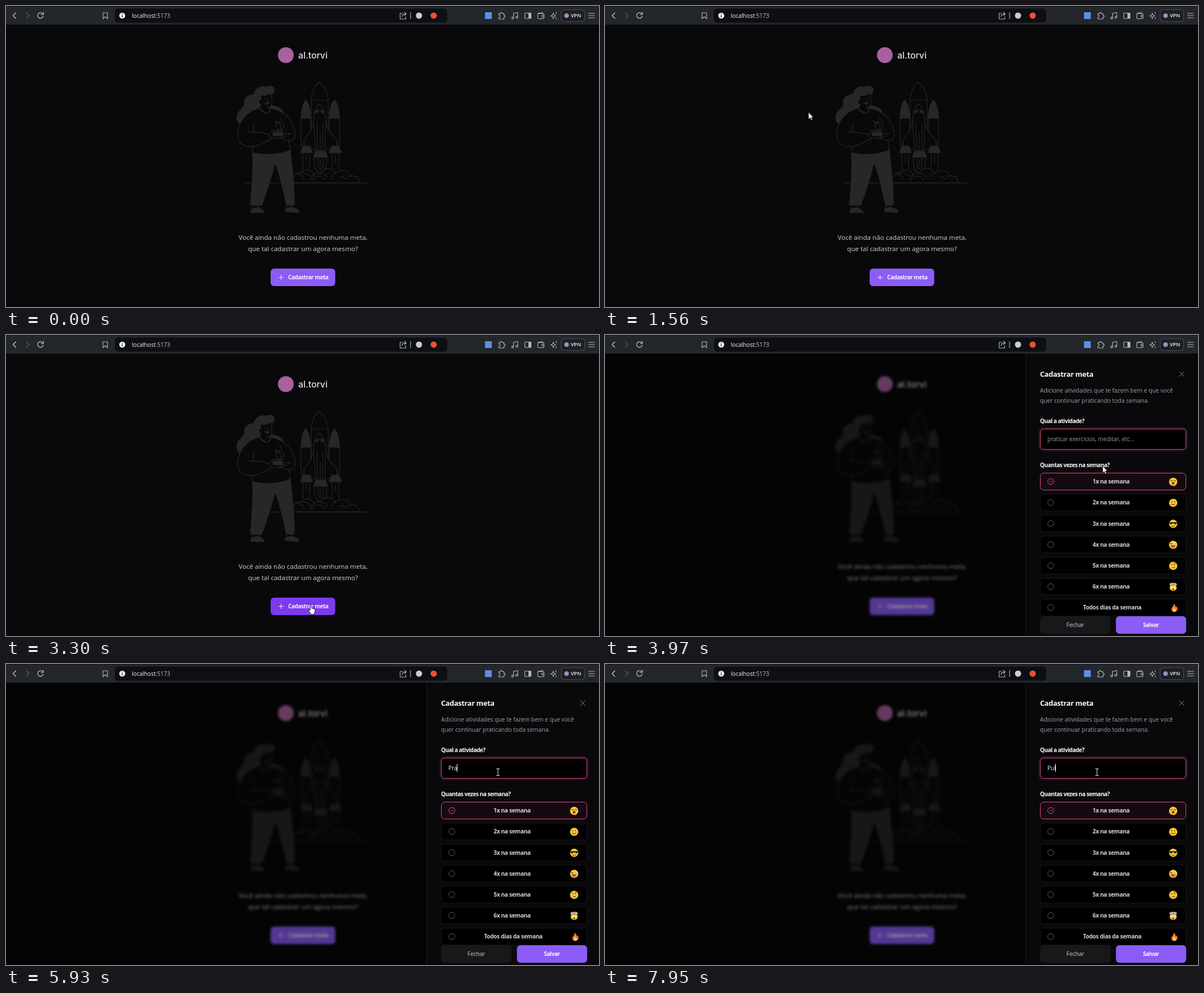
Write an HTML page that moves like this. It is 1051 px wide and 533 px high and loops after 8 s.

```html
<!DOCTYPE html>
<html lang="pt">
<head>
<meta charset="utf-8">
<style>
html, body { margin: 0; width: 100%; height: 100%; overflow: hidden; background: #09090b; }
svg { display: block; width: 100vw; height: 100vh; font: 10.1px "Open Sans", "Noto Sans", sans-serif; }
.mid { text-anchor: middle; }
.b { font-weight: 700; letter-spacing: -.025em; }
.tight { letter-spacing: -.05em; }
.line { fill: none; stroke-linecap: round; stroke-linejoin: round; }
#art { fill: #09090b; stroke: #27272a; stroke-width: 1.1; stroke-linejoin: round; stroke-linecap: round; }
#art .f { fill: #27272a; }
#art .n { fill: none; }
.dim #page { filter: blur(2.2px) brightness(.6); }
.dim #back { fill: #040405; }
#panel { display: none; }
.dim #panel { display: inline; }
</style>
</head>
<body>
<svg id="stage" viewBox="0 0 1051 533">
  <rect id="back" width="1051" height="533" fill="#09090b"/>
  <g id="page">
    <circle cx="496" cy="87" r="14" fill="#a9609f"/>
    <text x="518" y="92.8" fill="#e4e4e7" style="font:500 15.8px Inter,sans-serif">al.torvi</text>
    <g id="art">
      <!-- rocket -->
      <path d="M541 250V168C541 153 546 142 555 135C564 142 570 153 571 168V250M541 168Q556 165 571 168"/>
      <path d="M523 248V198H540V248ZM573 248V198H591V248Z"/>
      <path class="f" d="M523 199C523 185 526 173 531 166C537 173 540 185 540 199ZM573 199C573 185 576 173 582 166C588 173 591 185 591 199Z"/>
      <path d="M545 205C544 220 532 230 528 238V252L545 254H567L587 252V238C580 230 568 220 567 205Z"/>
      <path d="M545 205C545 188 549 178 555 174C562 178 567 188 567 205L565 256H549Z"/>
      <path class="f" d="M548 187L554 183V187L549 190ZM558 183L564 187L562 190L558 187Z"/>
      <path class="n" d="M557 225V255M551 206L552 254M562 206L561 254M528 238L529 250M587 238L586 250"/>
      <path class="f" d="M526 248H539L543 260H522ZM577 248H590L595 260H573ZM549 257H566L570 268H545Z"/>
      <path class="n" d="M526 261V290M532 264V278M538 261V288M578 261V288M584 264V278M590 261V291M547 269C545 283 548 291 557 297C567 291 569 283 568 269M553 269V280Q553 286 557 289Q562 286 562 280V269M557 272V283"/>
      <path d="M510 303C511 296 519 294 523 296C528 287 543 290 546 299C550 294 554 294 557 297C562 284 580 286 584 296C592 289 608 290 611 301C620 299 626 305 626 313H508Z"/>
      <path class="n" d="M514 298C521 297 526 301 527 306M523 296C531 294 537 298 539 302M546 299C541 301 540 305 540 309M543 308C546 299 560 299 564 308M557 297C563 296 568 299 570 304M584 296C578 298 577 301 577 305M590 304C593 301 599 302 602 306M611 301C608 301 605 303 604 306"/>
      <path class="n" d="M423 313.5H644"/>
      <!-- woman -->
      <path class="f" d="M468 158C476 155 478 146 472 143C467 140 464 144 458 143C448 142 441 148 440 156C430 159 421 160 423 173C421 183 409 185 409 198C409 205 413 208 417 210L470 200L493 193C490 179 481 179 470 176Z"/>
      <path d="M452 158C459 160 465 157 470 154C471 162 472 169 471 174C469 180 466 181 462 180L470 182L463 191L449 182L452 174C447 172 447 165 452 166Z"/>
      <path class="n" d="M458 164H461M466 163H468M463 165L465 169H463M459 172Q463 175 466 171"/>
      <path class="f" d="M458 171Q463 173 467 170Q464 178 458 171Z"/>
      <path d="M448 181C432 185 417 198 413 214C407 233 412 248 432 249H438L436 260C456 266 491 263 504 255L501 238C509 241 514 234 512 222C509 204 496 186 469 181C469 185 467 189 464 190C458 190 452 187 448 181Z"/>
      <path class="n" d="M440 207C437 214 438 219 440 224M428 223Q449 222 467 228M432 249C449 249 462 239 472 235M501 238C493 238 489 235 487 231M483 196C487 197 488 200 488 202"/>
      <path d="M467 226C471 219 475 222 480 220H489V235L472 234Q466 232 467 226ZM478 212L483 221H490L493 211C491 203 481 202 478 212ZM485 206L476 204Q480 209 485 209Z"/>
      <path class="f" d="M474 224Q484 221 491 225V230H475Q471 227 474 224Z"/>
      <path class="n" d="M486 226H504M487 210V220M501 225L504 226L501 228M483 234Q493 233 497 229"/>
      <path class="f" d="M437 260C460 265 489 263 504 255C507 286 512 320 511 352L497 353C492 326 486 302 477 277C470 304 463 328 453 353L433 352C436 324 438 291 437 260Z"/>
      <path d="M437 353H449L447 359H436ZM497 353H507V359H497Z"/>
      <path class="f" d="M434 366C433 359 440 357 447 357C452 359 457 362 458 366ZM495 364C494 358 501 356 508 357C514 358 519 361 520 366Z"/>
    </g>
    <g class="mid" fill="#d4d4d8" font-size="11.62">
      <text x="526.4" y="414.2">Você ainda não cadastrou nenhuma meta,</text>
      <text x="526.4" y="434.4">que tal cadastrar um agora mesmo?</text>
    </g>
    <rect id="add" x="469" y="465" width="114.500" height="31" rx="6"/>
    <path class="line" d="M483.500 480.500h8m-4-4v8" stroke="#f5f3ff"/>
    <text class="b tight" x="500" y="484" fill="#f5f3ff">Cadastrar meta</text>
  </g>

  <g id="panel">
    <path d="M745 33H1051V533H745Z" fill="#09090b"/>
    <path d="M745.500 33V533" stroke="#1b1b1e"/>
    <text class="b" x="771" y="74" fill="#fafafa" font-size="12.75">Cadastrar meta</text>
    <path class="line" d="M1018 65l8.500 8.500m0-8.500l-8.500 8.500" stroke="#85858d"/>
    <g fill="#a1a1aa" font-size="10.25">
      <text x="771" y="101.500">Adicione atividades que te fazem bem e que você</text>
      <text x="771" y="119.500">quer continuar praticando toda semana.</text>
    </g>
    <g class="b tight" fill="#fafafa">
      <text x="771" y="155.500">Qual a atividade?</text>
      <text x="771" y="233.800">Quantas vezes na semana?</text>
    </g>
    <rect x="769.500" y="164.500" width="262" height="40" rx="8" fill="none" stroke="#ec4899" stroke-opacity=".13" stroke-width="3"/>
    <rect x="771.500" y="166.500" width="258" height="36" rx="6" fill="#000" stroke="#e0468f"/>
    <text id="hint" x="784" y="188" fill="#9a9aa2">praticar exercícios, meditar, etc...</text>
    <text id="typed" x="784" y="188" fill="#f4f4f5"></text>
    <rect id="caret" y="177" width="1" height="14" fill="#fff"/>
    <g id="rows"></g>
    <rect x="771" y="498" width="125" height="31" rx="6" fill="#18181b"/>
    <rect x="905.500" y="498" width="124.500" height="31" rx="6" fill="#8b5cf6"/>
    <g class="b tight mid">
      <text x="833.500" y="517.200" fill="#a1a1aa" style="font-weight:600;letter-spacing:-.025em">Fechar</text>
      <text x="967.500" y="517.200" fill="#f5f3ff">Salvar</text>
    </g>
  </g>

  <!-- browser bar -->
  <path d="M0 0H1051V33H0Z" fill="#23272b"/>
  <path d="M0 .5H1051" stroke="#0d1013"/>
  <rect x="193" y="4.500" width="589" height="25" rx="6" fill="#0d0f12"/>
  <text x="223" y="20.800" fill="#f4f4f5">localhost<tspan fill="#c4c7cb">:5173</tspan></text>
  <circle cx="206" cy="17" r="5.300" fill="#f1f1f1"/>
  <path d="M206 16.200V20M206 13.500V15" stroke="#0d0f12" stroke-width="1.300"/>
  <circle cx="732" cy="17" r="5.500" fill="#c9ccd1"/>
  <circle cx="758" cy="17" r="5.500" fill="#f0502f"/>
  <rect x="849" y="11" width="12" height="12" fill="#5a8fe6"/>
  <g class="line" stroke="#b4b8bf" stroke-width="1.100">
    <path d="M17.500 12l-5 5l5 5M65 13.500a5 5 0 1 0 1 4.500M66.300 11v4h-4" stroke="#d6d9dd"/>
    <path d="M36 12l5 5l-5 5" stroke="#5a5e64"/>
    <path d="M172 12h8v10.500l-4-3.500l-4 3.500Z"/>
    <path d="M703 13h-4.500v10h10v-4M702 19c0-4 3-5 7-5M706 11l3.500 3l-3.500 3M717 11.500V22.500"/>
    <path d="M873.500 13.500h3c-1-3 4-3 3 0h3v3c3-1 3 4 0 3v3.500h-9v-3c3 1 3-5 0-4Z"/>
    <path d="M899.500 21V13l7.500-1.500v8"/>
    <circle cx="898" cy="21.300" r="1.700"/><circle cx="905.300" cy="20" r="1.700"/>
    <rect x="919.500" y="12.500" width="11" height="9.500" rx="1"/>
    <path d="M926.500 13h4v8.500h-4Z" fill="#b4b8bf"/>
    <rect x="942.500" y="13.500" width="11" height="9" rx="1.500"/>
    <path d="M943 13l8-1.500v2M953.500 16.500h-3.500v3h3.500"/>
    <path d="M970 12.500q.5 4.500 4.500 5q-4 .5-4.500 5q-.5-4.500-4.500-5q4-.5 4.500-5ZM975 11v3M975 20.500v2.500"/>
    <rect x="984" y="6.500" width="41.500" height="21" rx="5" stroke="#484d53" fill="#1c2023"/>
    <path d="M1032.500 13h10.500M1032.500 17h10.500M1032.500 21h10.500"/>
  </g>
  <circle cx="993.500" cy="17" r="4" fill="#a08fc4"/>
  <text x="1001" y="20.300" fill="#f1f1f1" font-size="9" font-weight="600">VPN</text>

  <g id="pointer">
    <path id="arrow" d="M0 0V12.300L2.800 9.700L4.700 14L6.700 13.200L4.900 9H8.700Z" fill="#fff" stroke="#000" stroke-width=".7"/>
    <path id="hand" d="M-1.200 9.500V1Q0-.8 1.200 1V6L6 7.300Q7.600 7.800 7.400 10Q7.200 13 6 14.500V17H-.8V15Q-3 12.500-4.200 9.500Q-3.300 7.700-1.200 10Z" fill="#fff" stroke="#000" stroke-width=".8"/>
    <path id="beam" class="line" d="M-2.500-5.500H-.7L0-5L.7-5.500H2.500M0-5V6M-2.500 6.500H-.7L0 6L.7 6.500H2.500" stroke="#eee"/>
  </g>
</svg>
<script>
const $ = id => document.getElementById(id);

// faces drawn around 0,0
const face = '<circle r="7.300" fill="#fcc934"/>';
const eyes = '<path d="M-2.500-3v2M2.500-3v2" stroke="#4a3313" stroke-width="1.500"/>';
const curve = (d, w = 1.1) => `<path class="line" d="${d}" stroke="#4a3313" stroke-width="${w}"/>`;
const flame = (s, c) => `<path transform="translate(2 ${7 - 7 * s}) scale(${s})" fill="${c}" d="M-1-7.500C3-4 2-2 3-1Q4-2 4-3C8 3 4 7 0 7C-5 7-7 2-3-2Q-1-4-1-7.500Z"/>`;
const emojis = [
  face + curve('M-4.500-1.500l3-1M4.500-1.500l-3-1') + '<ellipse cy="2.500" rx="2.200" ry="2.800" fill="#7b3518"/><path d="M0 4Q3 2 5 4L3 7.500H0Z" fill="#eda52a"/>',
  face + eyes + curve('M-3.500 2Q0 5 3.500 2'),
  face + '<path d="M-7-3H7L6 0Q3 2 1-1H-1Q-3 2-6 0Z" fill="#252329"/>' + curve('M-3 3.500Q0 5.500 3 3.500'),
  face + curve('M-5-2l3 0') + '<circle cx="3" cy="-2" r="1.900" fill="#fff"/><circle cx="3" cy="-2" r=".9" fill="#4a3313"/><path d="M-4 1H4Q3 5 0 5T-4 1Z" fill="#6b2f16"/><path d="M-1.500 2H2.500V6Q.5 8-1.500 6Z" fill="#ef5b6c"/>',
  face + eyes + curve('M-2 3.500Q1 2.500 3 3.500M1-4.500l3-.5'),
  '<path d="M-7-4Q-5-8 0-7Q5-8 7-4L3-1H-3Z" fill="#b9b2ad"/><path d="M-3-3L0-6L3-3Z" fill="#f5683c"/><path d="M-6-1L-3-3L0-1L3-3L6-1Q7 7 0 7T-6-1Z" fill="#fcc934"/>' +
    '<circle cx="-2.500" cy="1" r="1.200" fill="#fff"/><circle cx="2.500" cy="1" r="1.200" fill="#fff"/><circle cy="4.500" r="1.500" fill="#6b2f16"/>',
  flame(1, '#f4762c') + flame(.55, '#fdd24a'),
];

$('rows').innerHTML = emojis.map((art, i) => {
  const on = i === 0, y = 259.5 + 37.2 * i;
  const label = i < 6 ? `${i + 1}x na semana` : 'Todos dias da semana';
  return `<g transform="translate(0 ${y})">
    <rect x="771.5" y="-15" width="258" height="30" rx="6" fill="${on ? '#160a11' : '#000'}" stroke="${on ? '#e0468f' : '#18181b'}"/>
    <circle cx="790" r="5.300" fill="none" stroke="${on ? '#ec4899' : '#5b5b63'}"/>
    ${on ? '<path class="line" d="M788 0l1.500 1.500l2.700-3" stroke="#ec4899"/>' : ''}
    <text class="b mid" x="${i < 6 ? 897 : 899}" y="3.600" fill="#d4d4d8" font-size="10">${label}</text>
    <g transform="translate(1007 .5)">${art}</g></g>`;
}).join('');

// pointer path: time, x, y
const path = [
  [590, 917, 506], [720, 850, 410], [860, 720, 270], [1000, 560, 150], [1100, 460, 123], [1220, 370, 150],
  [1350, 342, 186], [1560, 361, 188], [1700, 325, 225], [1840, 275, 300], [1980, 305, 375], [2100, 375, 430],
  [2200, 439, 465], [2270, 478, 487], [2340, 513, 496], [2480, 538, 489], [2620, 552, 484], [2760, 556, 482],
  [2900, 556, 482], [3040, 548, 480], [3240, 541, 478], [3440, 539, 477], [3700, 539, 477], [3840, 690, 375],
  [3970, 882, 232], [4110, 878, 208], [4250, 868, 192], [4470, 865, 189], [4530, 865, 189], [4670, 872, 191],
];

// field states: time, text, caret shown
const field = [
  [3370, '', 1], [3970, '', 0], [4470, '', 1], [5000, '', 0], [5530, '', 1], [5660, 'P', 1],
  [5860, 'Pr', 1], [5930, 'Pra', 1], [6150, 'Prat', 1], [6350, 'Prati', 1], [6420, 'Pratic', 1],
  [6490, 'Pratica', 1], [6690, 'Praticar', 1], [7220, 'Praticar', 0], [7290, '', 1],
  [7550, 'P', 1], [7750, 'Pu', 1], [7950, 'Pul', 1],
];

const show = (id, on) => $(id).setAttribute('visibility', on ? 'visible' : 'hidden');

function position(t) {
  const i = path.findIndex(p => p[0] > t);
  if (i < 0) return path.at(-1).slice(1);
  if (i === 0) return path[0].slice(1);
  const [a, b] = [path[i - 1], path[i]], k = (t - a[0]) / (b[0] - a[0]);
  return [1, 2].map(n => a[n] + (b[n] - a[n]) * k);
}

function draw(t) {
  const open = t >= 3370;
  $('stage').classList.toggle('dim', open);

  const [x, y] = position(t);
  const hover = !open && t >= 590 && x > 469 && x < 584 && y > 465 && y < 495;
  const hand = hover || (open && t < 3440), beam = t >= 4200;
  $('add').setAttribute('fill', hover ? '#7c3aed' : '#8b5cf6');
  $('pointer').setAttribute('transform', `translate(${x} ${y})`);
  show('arrow', t >= 590 && !hand && !beam);
  show('hand', hand);
  show('beam', beam);

  if (!open) return;
  const [, text, caret] = field.findLast(s => s[0] <= t);
  $('typed').textContent = text;
  $('hint').style.display = text ? 'none' : '';
  $('caret').setAttribute('x', 784 + (text ? Math.round($('typed').getComputedTextLength()) - 1 : 0));
  $('caret').style.opacity = caret;
}

const start = performance.now();
function tick() {
  draw((performance.now() - start) % 8000);
  requestAnimationFrame(tick);
}
tick();
</script>
</body>
</html>
```
